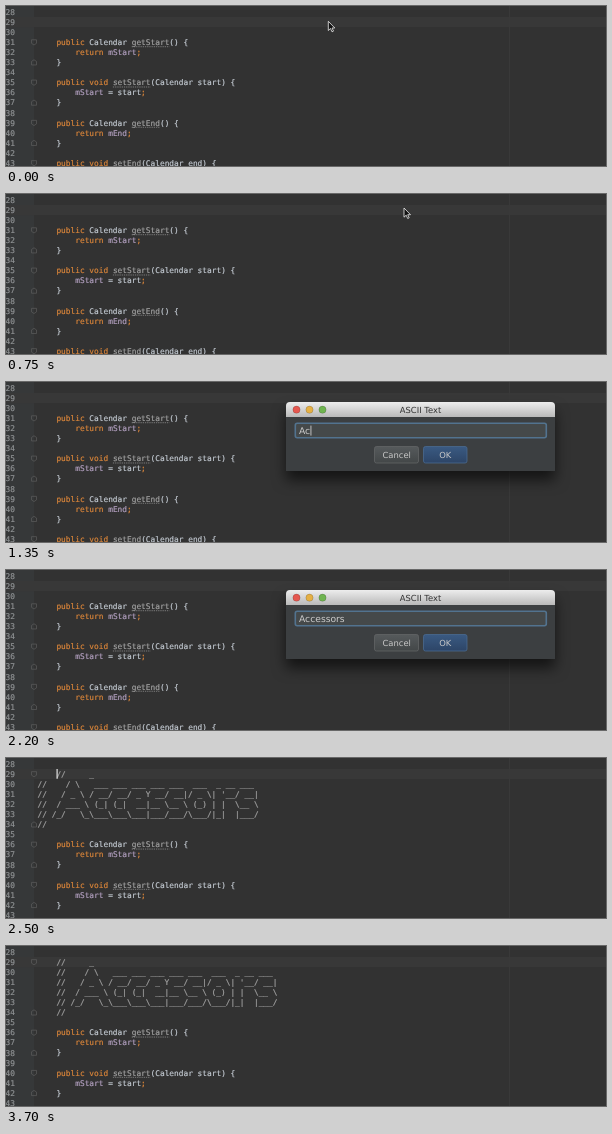
An HTML page that plays this animation: 600 px wide and 160 px high, repeating every 3800 ms.

```html
<!DOCTYPE html>
<html lang="en">
<head>
<meta charset="utf-8">
<title>Comment banner</title>
<style>
  html, body { margin: 0; width: 100%; height: 100%; overflow: hidden; background: #323232; }
  svg { display: block; width: 100%; height: 100%; }
  text { white-space: pre; text-rendering: geometricPrecision; }
  .mono {
    font: 7.82px "DejaVu Sans Mono", monospace; color: #c3cad2;
    fill: currentColor; stroke: currentColor; stroke-width: .18;
  }
  .ui { font: 8.4px "DejaVu Sans", sans-serif; fill: #c8c8c8; }
  .number { color: #8f9294; text-anchor: end; }
  .keyword { color: #dc863a; }
  .field { color: #b3a0c0; }
  .method { color: #a2a2a2; }
  .comment { color: #a4a4a4; }
  .squiggle { stroke: #8c8c8c; stroke-width: .8; stroke-dasharray: 1.3 .9; }
  .fold { fill: none; stroke: #5c5c5c; stroke-width: .7; }
  #dialog { filter: drop-shadow(0 9px 7px rgba(0, 0, 0, .6)); }
</style>
</head>
<body>
<svg viewBox="0 0 600 160" preserveAspectRatio="none">
  <defs>
    <linearGradient id="bar" x2="0" y2="1"><stop stop-color="#ededed"/><stop offset="1" stop-color="#b9b9b9"/></linearGradient>
    <linearGradient id="plain" x2="0" y2="1"><stop stop-color="#565a5c"/><stop offset="1" stop-color="#434748"/></linearGradient>
    <linearGradient id="primary" x2="0" y2="1"><stop stop-color="#3a5a82"/><stop offset="1" stop-color="#2d4567"/></linearGradient>
  </defs>
  <rect width="600" height="160" fill="#323232"/>
  <rect width="28" height="160" fill="#363839"/>
  <rect y="11" width="600" height="10.1" fill="#383838"/>
  <path d="M503.5 0V160" stroke="#393939"/>
  <g id="numbers"></g>
  <g id="code"></g>
  <g id="banner"></g>
  <rect id="caret" x="50.5" y="11" width="1.2" height="9.8" fill="#e4e4e4"/>
  <g id="dialog">
    <path d="M280 89V24q0-4 4-4H545q4 0 4 4V89Z" fill="#3c3f41"/>
    <path d="M280 35V24q0-4 4-4H545q4 0 4 4V35Z" fill="url(#bar)"/>
    <g stroke="#0004" stroke-width=".6">
      <circle cx="290.5" cy="27.7" r="3.6" fill="#e5574f"/>
      <circle cx="303.5" cy="27.7" r="3.6" fill="#e5b044"/>
      <circle cx="316.5" cy="27.7" r="3.6" fill="#6fb450"/>
    </g>
    <text class="ui" x="414.5" y="30.8" text-anchor="middle" style="fill:#333">ASCII Text</text>
    <rect x="289.3" y="41.3" width="251" height="14.4" rx="2" fill="#45494a" stroke="#52738f" stroke-width="1.6"/>
    <text class="ui" id="input" x="293" y="51.8" style="font-size:9.2px;fill:#ccc"></text>
    <rect id="inputCaret" y="43.6" width=".9" height="10" fill="#ccc"/>
    <rect x="368.5" y="64.5" width="44" height="16.5" rx="2" fill="url(#plain)" stroke="#626566" stroke-width=".8"/>
    <rect x="417.5" y="64.5" width="43.5" height="16.5" rx="2" fill="url(#primary)" stroke="#4a6a90" stroke-width=".8"/>
    <text class="ui" x="390.7" y="75.8" text-anchor="middle">Cancel</text>
    <text class="ui" x="439.3" y="75.8" text-anchor="middle">OK</text>
  </g>
  <path id="pointer" d="M0 0V9.2L2.2 7.2 3.7 10.5 5.2 9.8 3.7 6.7H6.5Z" fill="#111" stroke="#eee" stroke-width=".8"/>
</svg>
<script>
const LOOP = 3800, STEP = 50;
const ROW = 10.07, CHAR = 4.708, LEFT = 50.4, FIRST = 28;
const $ = id => document.getElementById(id);
const baseline = row => 8.8 + (row - FIRST) * ROW;

function add(parent, tag, attrs, text = '') {
  const node = document.createElementNS('http://www.w3.org/2000/svg', tag);
  for (const name in attrs) node.setAttribute(name, attrs[name]);
  node.textContent = text;
  return parent.appendChild(node);
}

function addFold(parent, row, closing) {
  const y = baseline(row) - 2.7, s = closing ? -1 : 1;
  add(parent, 'path', { class: 'fold', d: 'M-2.5-2.5H2.5V1L0 2.7-2.5 1Z', transform: `translate(28 ${y}) scale(1 ${s})` });
}

function classOf(token) {
  if (/^(public|void|return|;)$/.test(token)) return 'keyword';
  if (/^m[A-Z]/.test(token)) return 'field';
  if (/^[gs]et[A-Z]/.test(token)) return 'method';
  return '';
}

function addCode(row, source) {
  const line = add($('code'), 'text', { class: 'mono', x: LEFT, y: baseline(row) });
  let column = 0;
  for (const token of source.match(/\w+|;|[^\w;]+/g) || []) {
    const kind = classOf(token);
    add(line, 'tspan', { class: kind }, token);
    if (kind === 'method') {
      const x = LEFT + column * CHAR, y = baseline(row) + 1.7;
      add($('code'), 'path', { class: 'squiggle', d: `M${x} ${y}h${token.length * CHAR}` });
    }
    column += token.length;
  }
  if (/^public/.test(source)) addFold($('code'), row, false);
  if (source === '}') addFold($('code'), row, true);
}

for (let n = FIRST; n <= 43; n++) add($('numbers'), 'text', { class: 'mono number', x: 9, y: baseline(n) }, n);

`public Calendar getStart() {
    return mStart;
}

public void setStart(Calendar start) {
    mStart = start;
}

public Calendar getEnd() {
    return mEnd;
}

public void setEnd(Calendar end) {`.split('\n').forEach((source, i) => addCode(31 + i, source));

const bannerRows = String.raw`     _
    / \   ___ ___ ___ ___ ___  ___  _ __ ___
   / _ \ / __/ __/ _ Y __/ __|/ _ \| '__/ __|
  / ___ \ (_| (_|  __|__ \__ \ (_) | |  \__ \
 /_/   \_\___\___\___|___/___/\___/|_|  |___/
`.split('\n').map((art, i) =>
  add($('banner'), 'text', { class: 'mono comment', x: LEFT, y: baseline(29 + i) }, '//' + art));
addFold($('banner'), 29, false);
addFold($('banner'), 34, true);

const WORD = 'Accessors';
const KEY_TIMES = [1150, 1350, 1450, 1500, 1650, 1700, 1800, 1850, 2100];
const PASTE = 2450, INDENT = 2850;

const show = (id, on) => $(id).style.display = on ? '' : 'none';
const between = (t, from, to) => t >= from && t < to;

function draw(t) {
  const p = Math.min(1, t / 450), ease = p * p * (3 - 2 * p);
  $('pointer').setAttribute('transform', `translate(${322.3 + 75.7 * ease} ${15.3 - 1.3 * ease})`);
  show('pointer', t < 1150);

  show('dialog', between(t, 950, 2300));
  const typed = WORD.slice(0, KEY_TIMES.filter(k => k <= t).length);
  if ($('input').textContent !== typed) $('input').textContent = typed;
  show('inputCaret', between(t, 1000, 2200));
  if (between(t, 950, 2300)) {
    $('inputCaret').setAttribute('x', 293.3 + (typed ? $('input').getComputedTextLength() : 0));
  }

  const pasted = t >= PASTE;
  show('banner', pasted);
  show('caret', between(t, PASTE, 3550));
  $('code').setAttribute('transform', `translate(0 ${pasted ? 5 * ROW : 0})`);
  bannerRows.forEach((row, i) => row.setAttribute('x', i && t < INDENT ? LEFT - 4 * CHAR : LEFT));
}

const start = performance.now();
function tick() {
  const t = (performance.now() - start) % LOOP;
  draw(Math.floor(t / STEP) * STEP);
  requestAnimationFrame(tick);
}
tick();
</script>
</body>
</html>
```
